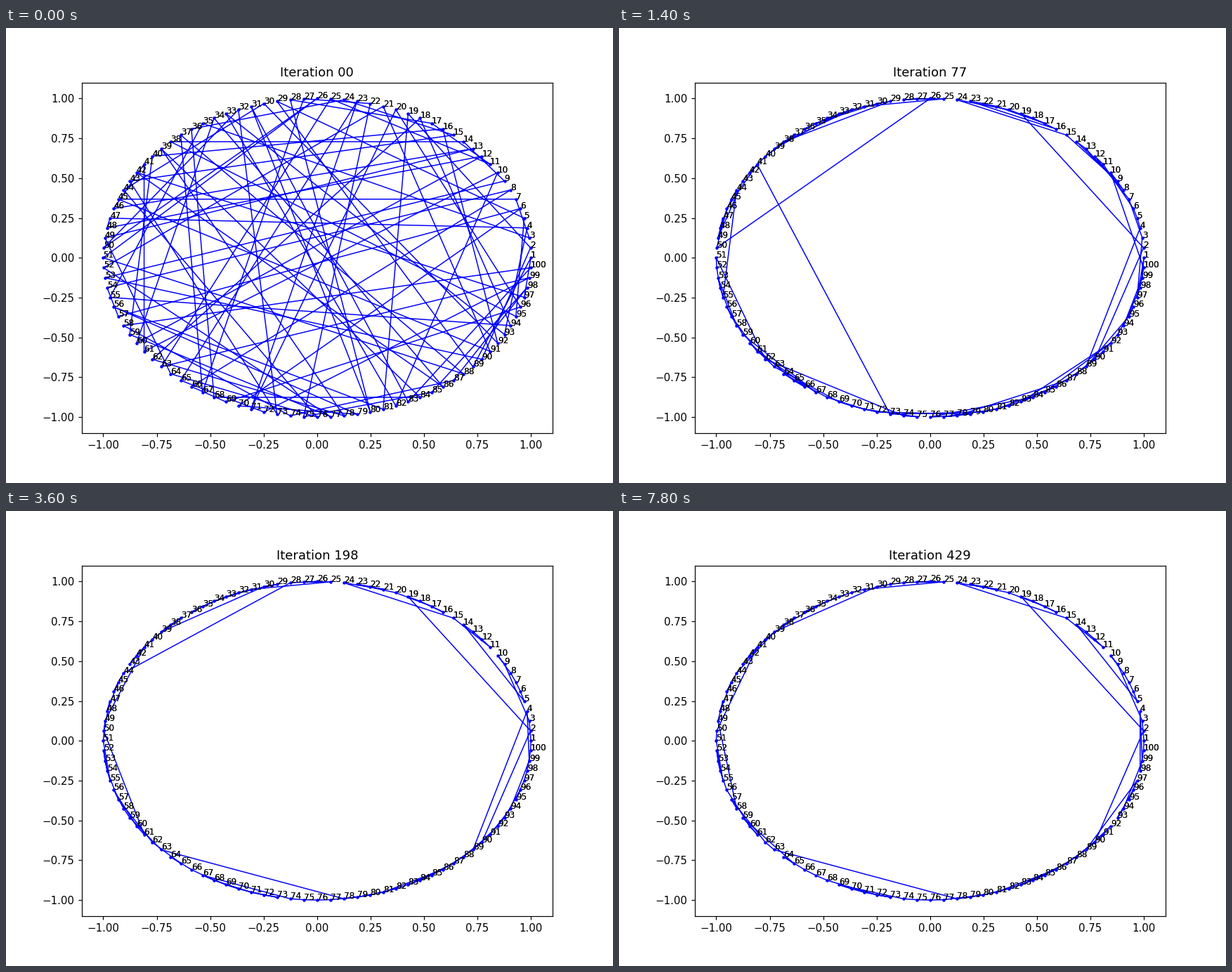
A matplotlib script for the animation above (8000 ms loop, 864 px wide and 648 px high).

```python
import matplotlib.pyplot as plt
import numpy as np
from matplotlib.animation import FuncAnimation

N = 100
STEP = 11               # iterations per frame
FRAMES = 40
PINNED = (19, 2, 90)    # labels of cities that always follow one another

angle = 2 * np.pi * np.arange(N) / N
X, Y = np.cos(angle), np.sin(angle)

dist = np.hypot(X[:, None] - X, Y[:, None] - Y)
pinned = np.array(PINNED) - 1
for a, b in zip(pinned, pinned[1:]):
    dist[a, b] = dist[b, a] = -10   # never worth removing


def improve(tour, tries, rng):
    """Apply the best of some random 2-opt reversals if it shortens the tour."""
    i, j = np.sort(rng.integers(0, N, (2, tries)), axis=0)
    a, b = tour[i], tour[(i + 1) % N]
    c, d = tour[j], tour[(j + 1) % N]
    gain = dist[a, b] + dist[c, d] - dist[a, c] - dist[b, d]
    gain[i == j] = 0
    k = gain.argmax()
    if gain[k] > 1e-9:
        tour = tour.copy()
        tour[i[k] + 1:j[k] + 1] = tour[i[k] + 1:j[k] + 1][::-1]
    return tour


def search(seed):
    """Tours at every iteration; the search cools down as it goes."""
    rng = np.random.default_rng(seed)
    others = np.setdiff1d(np.arange(N), pinned)
    tours = [np.concatenate([pinned, rng.permutation(others)])]
    for n in range(STEP * (FRAMES - 1)):
        tries = max(3, int(150 * np.exp(-n / 70)))
        tours.append(improve(tours[-1], tries, rng))
    return tours


tours = search(4)

fig, ax = plt.subplots(figsize=(8, 6), dpi=108)
ax.plot(X, Y, "b.", markersize=4)
path, = ax.plot([], [], "b-", linewidth=1)
for k in range(N):
    for _ in range(2):   # doubled for a heavier look
        ax.text(X[k], Y[k], str(k + 1), fontsize=8)
ax.set_xlim(-1.1, 1.1)
ax.set_ylim(-1.1, 1.1)
title = ax.set_title("Iteration 00")


def update(i):
    n = i * STEP
    loop = np.append(tours[n], tours[n][0])
    path.set_data(X[loop], Y[loop])
    title.set_text(f"Iteration {n:02d}")
    return path, title


anim = FuncAnimation(fig, update, frames=FRAMES, interval=200,
                     repeat=True, repeat_delay=0)
plt.show()
```
